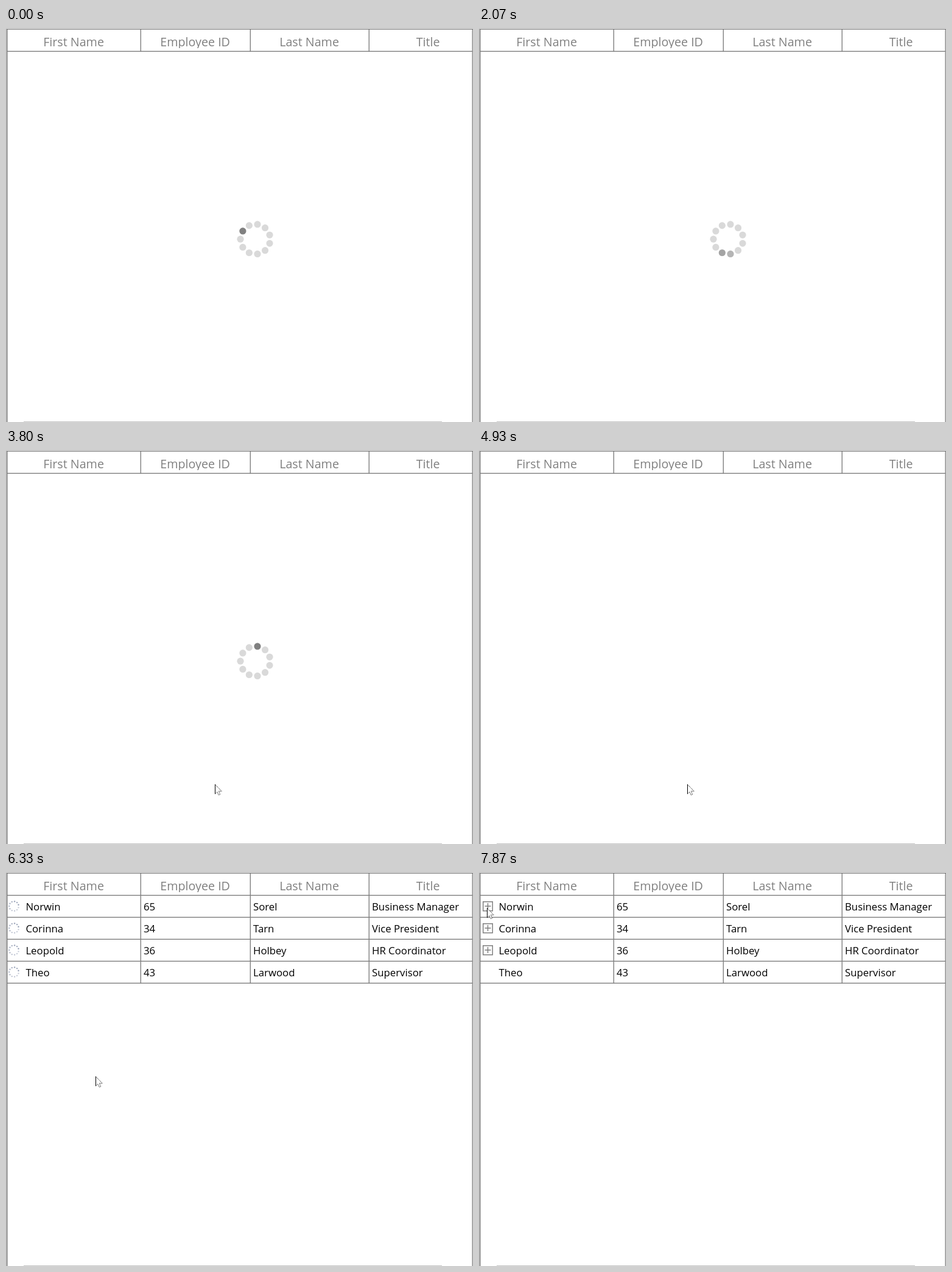
Animation of 767x646 px, one loop 8000 ms. Source, as an HTML page:

```html
<!DOCTYPE html>
<html lang="en">
<head>
<meta charset="utf-8">
<title>Loading grid</title>
<style>
  html, body { margin: 0; width: 100%; height: 100%; overflow: hidden; background: #fff; }
  svg { display: block; }
  text { font: 16.8px "Open Sans", "Noto Sans", sans-serif; fill: #000; }
  .head text { font-size: 19.7px; fill: #808080; text-anchor: middle; }
  .line { fill: #808080; }
  .faint { fill: #c4c4c4; }
  .box { fill: none; stroke: #808080; stroke-width: 1.5; }
</style>
</head>
<body>
<svg id="stage" width="767" height="646" viewBox="0 0 767 646">
  <defs><clipPath id="headClip"><rect width="767" height="33"/></clipPath></defs>
</svg>
<script>
const LOOP = 8000, FPS = 15;
const HIDE_LOADER = 74, SHOW_ROWS = 75, SHOW_BOXES = 101;
const TOP = 38, ROW_H = 36, DOTS = 11;
const EDGES = [2, 221, 401, 596, 791];
const HEADS = ['First Name', 'Employee ID', 'Last Name', 'Title'];
const ROWS = [
  ['Norwin', '65', 'Sorel', 'Business Manager'],
  ['Corinna', '34', 'Tarn', 'Vice President'],
  ['Leopold', '36', 'Holbey', 'HR Coordinator'],
  ['Theo', '43', 'Larwood', 'Supervisor']
];
// Pointer stops [step, x, y], joined by a smooth curve
const STOPS = [
  [38, 767, 611], [42, 519, 611], [52, 355, 556], [57, 343, 548], [82, 342, 548],
  [91, 183, 368], [95, 147, 335], [105, 108, 293], [107, 108, 293], [118, 13, 59]
];

const stage = document.getElementById('stage');

function add(parent, tag, attrs, content) {
  const el = document.createElementNS('http://www.w3.org/2000/svg', tag);
  for (const name in attrs) el.setAttribute(name, attrs[name]);
  if (content) el.textContent = content;
  return parent.appendChild(el);
}

const group = (attrs = {}) => add(stage, 'g', attrs);
const bar = (parent, x, y, width, height, cls = 'line') =>
  add(parent, 'rect', { class: cls, x, y, width, height });
const across = (parent, y) => bar(parent, 2, y - 0.4, 764, 1.4);
const dividers = (parent, y, height) =>
  EDGES.slice(1, -1).forEach(x => bar(parent, x - 0.4, y, 1.4, height));
const show = (el, on) => el.setAttribute('display', on ? 'inline' : 'none');
const mod = (v, n) => (v % n + n) % n;

function ring(parent, cx, cy, radius, size) {
  return Array.from({ length: DOTS }, (_, i) => {
    const a = (i + 0.25) / DOTS * 2 * Math.PI;
    return add(parent, 'circle', {
      cx: cx + radius * Math.sin(a), cy: cy - radius * Math.cos(a), r: size
    });
  });
}

// Monotone cubic curve through column c of the stops
function glide(keys, step, c) {
  const last = keys.length - 1;
  const slope = i => (keys[i + 1][c] - keys[i][c]) / (keys[i + 1][0] - keys[i][0]);
  const tangent = i => {
    if (i === 0) return slope(0);
    if (i === last) return 0;
    const a = slope(i - 1), b = slope(i);
    return a * b > 0 ? 2 * a * b / (a + b) : 0;
  };
  let i = 0;
  while (i < last - 1 && keys[i + 1][0] <= step) i++;
  const span = keys[i + 1][0] - keys[i][0];
  const u = Math.min(1, Math.max(0, (step - keys[i][0]) / span)), v = 1 - u;
  return v * v * (1 + 2 * u) * keys[i][c] + u * u * (1 + 2 * v) * keys[i + 1][c]
    + u * v * span * (v * tangent(i) - u * tangent(i + 1));
}

// Frame and header
bar(stage, 0, 0, 1, 646, 'faint');
bar(stage, 1, 1, 1.5, 645);
bar(stage, 1, 1, 766, 1.5);
bar(stage, 765.5, 1, 1.3, 645);
bar(stage, 29, 645, 687, 1, 'faint');
across(stage, TOP);
dividers(stage, 2, TOP - 2);
const head = group({ class: 'head', 'clip-path': 'url(#headClip)' });
HEADS.forEach((label, c) =>
  add(head, 'text', { x: (EDGES[c] + EDGES[c + 1]) / 2 - 0.4, y: 29.7 }, label));

// Rows with their small spinners and expanders
const body = group(), spinners = group(), boxes = group();
dividers(body, TOP + 1, ROWS.length * ROW_H);
const smallRings = ROWS.map((cells, r) => {
  const y = TOP + 18 + r * ROW_H;
  across(body, y + 18);
  cells.forEach((value, c) =>
    add(body, 'text', { x: c ? EDGES[c] + 5 : 32.4, y: y + 7 }, value));
  if (r < ROWS.length - 1) {
    add(boxes, 'path', {
      class: 'box',
      d: `M6.75 ${y - 7.25}h15.5v15h-15.5zM9.5 ${y}h10M14.5 ${y - 5}v10`
    });
  }
  return ring(spinners, 13, y, 7.8, 1.2);
});

const loader = group();
const dots = ring(loader, 409.5, 346.2, 24.5, 5.6);

const pointer = group();
add(pointer, 'path', { fill: '#fff', d: 'M0 0V16L3.7 12.6 6 18 8.4 17 6 11.6H11.4Z' });
add(pointer, 'path', { fill: 'none', stroke: '#000', d: 'M.5 0V16' });
add(pointer, 'path', {
  fill: 'none', stroke: '#222', 'stroke-width': 0.9, 'stroke-dasharray': '1.2 .6',
  d: 'M.5 .5 11.2 11.4H6.4L8.6 16.8 6.2 17.8 3.9 12.6 .5 15.8'
});

function draw(time) {
  const step = Math.floor((time % LOOP + 5) * FPS / 1000) % (LOOP * FPS / 1000);

  // The dark dot runs clockwise and speeds up slightly once the pointer is in
  show(loader, step < HIDE_LOADER);
  const pos = 9 + 0.6 * step + 0.053 * Math.max(0, step - 42);
  dots.forEach((dot, i) => {
    const gap = mod(pos - i, DOTS);
    const near = Math.max(0, 1 - Math.min(gap, DOTS - gap));
    const tone = Math.round(217 - 89 * near);
    dot.setAttribute('fill', `rgb(${tone},${tone},${tone})`);
  });

  show(body, step >= SHOW_ROWS);
  show(spinners, step >= SHOW_ROWS && step < SHOW_BOXES);
  show(boxes, step >= SHOW_BOXES);
  smallRings.forEach(marks => marks.forEach((mark, i) => {
    const age = mod(pos - i, DOTS) / DOTS;
    mark.setAttribute('fill', '#8c96ae');
    mark.setAttribute('opacity', (0.95 - 0.55 * age).toFixed(2));
  }));

  show(pointer, step >= STOPS[0][0]);
  const [x, y] = [1, 2].map(c => Math.round(glide(STOPS, step, c)));
  pointer.setAttribute('transform', `translate(${x} ${y})`);
}

const start = performance.now();
function tick() {
  draw(performance.now() - start);
  requestAnimationFrame(tick);
}
tick();
</script>
</body>
</html>
```
